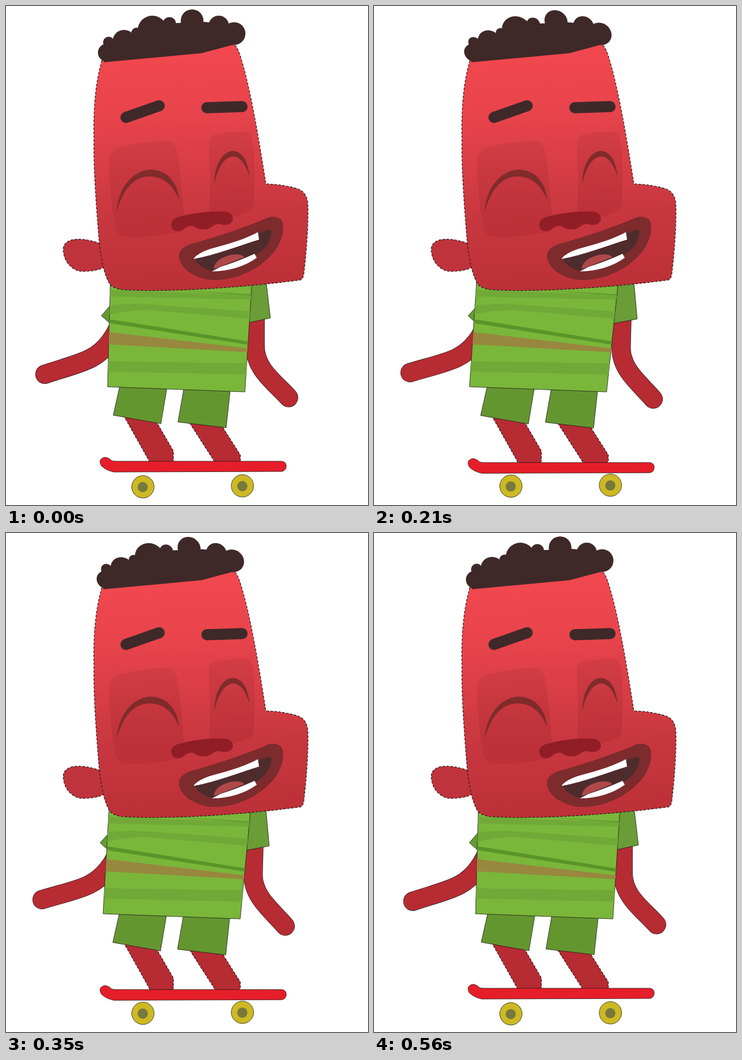
Recreate the animation shown at these times as an HTML page. Size 638x878 px, loop 0.63 s.

```html
<!DOCTYPE html>
<html lang="en">
<head>
<meta charset="utf-8">
<title>Skater</title>
<style>
  @property --sway { syntax: "<number>"; inherits: true; initial-value: 0; }
  @property --swing { syntax: "<number>"; inherits: true; initial-value: 0; }

  html, body { margin: 0; width: 100%; height: 100%; overflow: hidden; background: #fff; }
  svg { display: block; width: 100%; height: 100%; animation: ride 630ms step-end infinite; }

  /* nine held poses: sway drives body and hair, swing drives arms and board */
  @keyframes ride {
    0%      { --sway: 0;   --swing: 0; }
    11.111% { --sway: .46; --swing: .25; }
    22.222% { --sway: .95; --swing: .5; }
    33.333% { --sway: .67; --swing: .75; }
    44.444% { --sway: .13; --swing: 1; }
    55.555% { --sway: .5;  --swing: .75; }
    66.666% { --sway: 1;   --swing: .5; }
    77.777% { --sway: .5;  --swing: .25; }
    88.888%, 100% { --sway: 0; --swing: 0; }
  }

  .torso  { transform-origin: 0 410px; transform: skewX(calc(var(--sway) * -3.5deg)); }
  .hair   { transform-origin: 320px 90px; transform: skewX(calc(var(--sway) * 9.8deg)) scale(calc(1 + var(--sway) * .02), calc(1 - var(--sway) * .02)); }
  .shorts { transform: translate(calc(var(--sway) * -1.5px), calc(var(--sway) * .8px)); }
  .wheels { transform: translateY(calc(var(--sway) * -1.8px)); }
  .board  { transform: translateY(calc(var(--swing) * 3px)); }
  .left   { transform-origin: 166px 473px; transform: rotate(calc(var(--swing) * 2.2deg)); }
  .right  { transform-origin: 400px 470px; transform: rotate(calc(var(--swing) * 2.05deg)); }

  .edge { stroke: #1d1716; stroke-width: .8; }
  .rough { stroke: #1d1716; stroke-width: 1.2; stroke-dasharray: 4 3; }
  .limb { fill: none; stroke: #b72b33; stroke-width: 32.4; stroke-linecap: round; }
  .limb-edge { fill: none; stroke: #1d1716; stroke-width: 33.8; stroke-linecap: round; }
  .skin { fill: #b72b33; }
  .dark-hair { fill: #3e2928; }
  .brow { stroke: #3e2928; stroke-width: 19.5; stroke-linecap: round; }
  .lid { fill: #812b2b; }
</style>
</head>
<body>
<svg viewBox="0 0 638 878">
  <defs>
    <linearGradient id="face" gradientUnits="userSpaceOnUse" x1="280" y1="70" x2="300" y2="495">
      <stop offset="0" stop-color="#f3484f"/>
      <stop offset=".3" stop-color="#e7434b"/>
      <stop offset=".7" stop-color="#c8373f"/>
      <stop offset="1" stop-color="#bd3038"/>
    </linearGradient>
    <linearGradient id="socket" x1="0" y1="0" x2="0" y2="1">
      <stop offset="0" stop-color="#a92f3a" stop-opacity=".24"/>
      <stop offset="1" stop-color="#b32a33" stop-opacity=".5"/>
    </linearGradient>
    <clipPath id="shirt"><path d="M184 480H434L421 679 179 670Z"/></clipPath>
    <path id="arm-l" d="M205 548C194 580 177 605 151 619C131 630 101 637 68.500 648"/>
    <path id="arm-r" d="M439 545V600C440 640 474 662 498 689"/>
  </defs>

  <g class="left">
    <use href="#arm-l" class="limb-edge"/>
    <use href="#arm-l" class="limb"/>
    <path class="edge" fill="#649a33" d="M200 508L168 545 184 559 205 560Z"/>
  </g>
  <g class="right">
    <use href="#arm-r" class="limb-edge"/>
    <use href="#arm-r" class="limb"/>
    <path class="edge" fill="#6a9c37" d="M415 480H458L466 549 415 560Z"/>
  </g>

  <g class="skin rough">
    <path d="M207 720L252 800 258 812H290L295 800V783L263 728Z"/>
    <path d="M320 728L367 801 373 812H408L413 800V790L378 735Z"/>
  </g>
  <g class="shorts edge" fill="#649630">
    <path d="M202 662L285 664 273 735 189 720Z"/>
    <path d="M315 664L396 668 388 742 303 732Z"/>
  </g>

  <g class="torso">
    <path class="edge" fill="#7ab63a" d="M184 480H434L421 679 179 670Z"/>
    <g clip-path="url(#shirt)">
      <g fill="#70a937">
        <path d="M175 499L440 509V517L175 511Z"/>
        <path d="M175 528Q215 522 250 525L440 538V551L250 535Q215 534 175 545Z"/>
        <path d="M175 625L440 629V649L175 643Z"/>
      </g>
      <g fill="#5a9429">
        <path d="M290 499L440 508V510Z"/>
        <path d="M175 550L440 592V598L175 557Z"/>
      </g>
      <path fill="#98873f" d="M175 573L440 604V610L175 595Z"/>
    </g>
  </g>

  <path class="board edge" fill="#e61e29" d="M175 794Q182 795 186 800Q188 801 195 801H486Q494 802 494 810Q493 818 486 819L190 820Q176 817 168 809Q163 800 169 796Q172 794 175 794Z"/>
  <g class="wheels">
    <g class="edge" fill="#cdb922">
      <circle cx="241.300" cy="846" r="19.7"/>
      <circle cx="416.700" cy="844.3" r="19.7"/>
    </g>
    <g fill="#77783d">
      <circle cx="241" cy="846.5" r="9"/>
      <circle cx="416.5" cy="844.8" r="9"/>
    </g>
  </g>

  <path class="rough" fill="#bf333c" d="M166 418C140 408 104 405 101 426C100 450 118 467 135 467Q160 467 174 459"/>
  <path class="rough" fill="url(#face)" d="M169 96C156 140 154 190 155 235C154 290 160 360 163 400C166 440 172 470 182 488Q188 497 205 499C260 503 380 500 519 482Q524 480 525 470C530 430 533 380 532 350Q531 328 515 322Q490 314 458 313C445 230 430 140 412 85Q406 68 400 67L345 80 172 94Z"/>

  <g fill="url(#socket)">
    <path d="M183 264Q188 250 205 247Q245 238 285 237Q298 236 303 262C310 310 314 360 313 388Q312 397 300 399C260 406 220 408 205 405Q196 402 193 390C184 350 181 290 183 264Z"/>
    <path d="M358 235Q360 227 380 224Q415 219 425 221Q434 224 436 245Q440 310 436 355Q432 362 415 367Q375 378 366 374Q358 370 358 355C362 310 356 260 358 235Z"/>
  </g>
  <path class="lid" d="M195 362C198 315 228 288 255 288C285 288 303 312 305 341C293 312 275 300 253 300C225 300 207 322 195 362Z"/>
  <path class="lid" d="M367 313C367 280 382 255 400 255C418 256 427 275 429 300C420 272 410 265 400 265C385 266 374 283 367 313Z"/>
  <path class="brow" d="M211.500 196L270 175.500"/>
  <path class="brow" d="M354 179L416 177"/>
  <path fill="#911d26" d="M291 384Q292 374 305 371C330 364 360 360 388 362Q400 365 400 376Q396 387 382 385Q372 382 366 386Q358 394 346 393Q336 392 330 387Q322 385 313 393Q300 400 293 392Z"/>

  <path fill="#7d2b2d" d="M305 437Q308 425 325 419C380 404 430 386 462 372Q482 367 488 382C491 405 480 430 455 450C425 475 390 483 360 482C330 478 303 460 305 437Z"/>
  <path fill="#4e2b2d" d="M331 443C350 430 420 416 444 400Q462 393 467 395C470 412 455 430 441 437C420 452 395 466 366 467C350 464 338 456 331 443Z"/>
  <path fill="#b04749" d="M366 463Q368 445 395 438Q415 435 420 442L371 461Z"/>
  <g fill="#fff">
    <path d="M331 444Q340 433 365 426C400 417 425 408 444 398L446 411C410 422 370 438 331 445Z"/>
    <path d="M363 467L378 459Q410 449 438 436L442 443Q410 466 363 467Z"/>
  </g>

  <g class="hair dark-hair">
    <path d="M173 99L168 76 190 58 240 43 300 30 350 28 390 32 418 60 401 68 345 83Z"/>
    <circle cx="177.500" cy="82" r="15.500"/>
    <circle cx="181" cy="64" r="10"/>
    <circle cx="208" cy="62" r="20"/>
    <circle cx="230" cy="47" r="9"/>
    <circle cx="258" cy="43" r="26"/>
    <circle cx="288" cy="31" r="11.500"/>
    <circle cx="328" cy="26" r="20"/>
    <circle cx="375" cy="35" r="18"/>
    <circle cx="402" cy="48.500" r="20"/>
  </g>
</svg>
</body>
</html>
```
